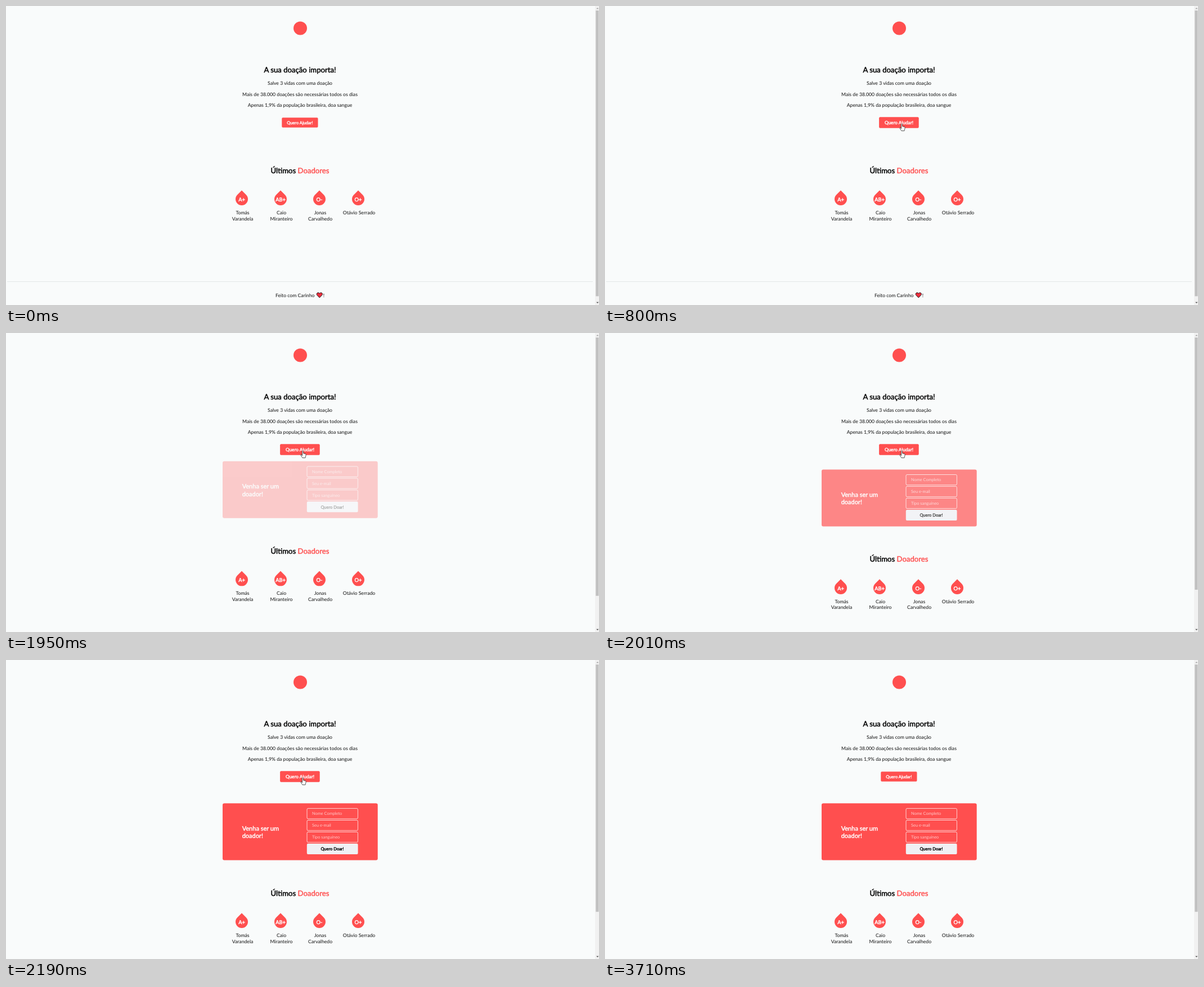
Write an HTML page that moves like this. It is 1054 px wide and 531 px high and loops after 4240 ms.

```html
<!DOCTYPE html>
<html lang="pt-BR">
<head>
<meta charset="utf-8">
<title>Doação de sangue</title>
<style>
html, body { margin: 0; width: 100%; height: 100%; overflow: hidden; background: #f9fbfb; }
svg { display: block; width: 1054px; height: 531px; }
text { font: 8.66px Lato, sans-serif; fill: #111; text-anchor: middle; text-rendering: geometricPrecision; }
.left { text-anchor: start; }
.bold { stroke: #000; stroke-width: .04em; fill: #000; }
.title { font-size: 13.15px; stroke-width: .033em; }
.lead { font-size: 11px; }
.label { font-size: 7.5px; stroke-width: .05em; }
.type { font-size: 9.3px; stroke-width: .05em; }
.hint { font-size: 7.4px; fill: #ffcaca; }
.white { fill: #fff; stroke: #fff; }
.red { fill: #ff4f4f; }
tspan.red { stroke: #ff4f4f; }
.field { fill: none; stroke: #fff; stroke-width: .75; }
.mouse { fill: #fff; stroke: #111; stroke-width: .7; stroke-linejoin: round; }
</style>
</head>
<body>
<svg viewBox="0 0 1054 531">
  <circle class="red" cx="523" cy="39.5" r="12"/>
  <text class="bold title" x="522.5" y="118">A sua doação importa!</text>
  <text x="522.5" y="140.3">Salve 3 vidas com uma doação</text>
  <text x="522.5" y="159.5">Mais de 38.000 doações são necessárias todos os dias</text>
  <text x="522.5" y="178.8">Apenas 1,9% da população brasileira, doa sangue</text>

  <g id="button">
    <rect class="red" x="490.3" y="198.2" width="64.2" height="17.6" rx="1.7"/>
    <text class="bold white label" x="522.4" y="209.9">Quero Ajudar!</text>
  </g>

  <g id="form">
    <rect class="red" x="385" y="254.5" width="275.7" height="101" rx="3"/>
    <text class="bold white left lead" x="419.7" y="303">Venha ser um</text>
    <text class="bold white left lead" x="419.7" y="316.2">doador!</text>
    <g id="fields"></g>
    <rect x="534.8" y="326" width="90.8" height="19" rx="2" fill="#f0f0f4"/>
    <text class="bold label" x="580" y="338.2">Quero Doar!</text>
  </g>

  <g id="low">
    <text class="bold title" x="522.5" y="296.6">Últimos <tspan class="red">Doadores</tspan></text>
    <g id="donors"></g>
    <path d="M2 489.5H1043" stroke="#dde3e3" stroke-width=".8"/>
    <text class="left" x="478.9" y="516.5">Feito com Carinho</text>
    <path d="M557.3 518L553 513.6C550.4 510.3 555 507.2 557.3 510.6C559.6 507.2 564.2 510.3 561.6 513.6Z"
      fill="#ee2f3f" stroke="#111" stroke-width="1" stroke-linejoin="round"/>
    <text x="565" y="516.5">!</text>
  </g>

  <rect x="1047" width="7" height="531" fill="#f1f1f1"/>
  <rect id="thumb" x="1048.3" y="8" width="5.2" fill="#c1c1c1"/>
  <path d="M1049.2 5.2h4.2l-2.1-2.2z" fill="#a3a3a3"/>
  <path d="M1049.2 525.8h4.2l-2.1 2.2z" fill="#505050"/>

  <circle id="press" cx="526" cy="210" r="6" fill="#fd0" opacity=".6"/>
  <path id="arrow" class="mouse" d="M0 0V9.3L2.1 7.3 3.6 10.6 5.1 9.9 3.7 6.7H6.6Z"/>
  <path id="hand" class="mouse" d="M-1 .5a1 1 0 0 1 2 0V4l3.6 .8q1.2 .4 1.1 1.7l-.6 3-.6 2.5h-5l-3-4.6q-.4-1.2 .8-1.2l.7 .7 1 1.2Z"/>
</svg>
<script>
const $ = id => document.getElementById(id);
const LOOP = 4240;

$('fields').innerHTML = ['Nome Completo', 'Seu e-mail', 'Tipo sanguíneo'].map((label, i) => {
  const y = 263.6 + 20.9 * i;
  return `<rect class="field" x="535" y="${y}" width="90.4" height="18.4" rx="2"/>
    <text class="hint left" x="544" y="${y + 11.8}">${label}</text>`;
}).join('');

$('donors').innerHTML = [
  ['A+', 'Tomás', 'Varandela'],
  ['AB+', 'Caio', 'Miranteiro'],
  ['O-', 'Jonas', 'Carvalhedo'],
  ['O+', 'Otávio Serrado', '']
].map(([type, first, last], i) => `<g transform="translate(${419 + 69 * i} 343)">
    <path class="red" transform="rotate(45)" d="M-11 -11H0A11 11 0 1 1 -11 0Z"/>
    <text class="bold white type" y="3.6">${type}</text>
    <text x="1.5" y="27">${first}</text>
    <text x="1.5" y="37.6">${last}</text>
  </g>`).join('');

const clamp = x => Math.min(1, Math.max(0, x));
const smooth = x => (x = clamp(x), x * x * (3 - 2 * x));
const mix = (a, b, p) => a + (b - a) * p;

// CSS "ease": cubic-bezier(.25, .1, .25, 1)
function ease(x) {
  if (x <= 0 || x >= 1) return clamp(x);
  const curve = (a, b, s) => 3 * a * s * (1 - s) ** 2 + 3 * b * s * s * (1 - s) + s ** 3;
  let lo = 0, hi = 1;
  for (let i = 0; i < 20; i++) {
    const mid = (lo + hi) / 2;
    if (curve(.25, .25, mid) < x) lo = mid; else hi = mid;
  }
  return curve(.1, 1, lo);
}

function pointer(t) {
  if (t < 130 || t >= 3710) return null;
  if (t < 680) {
    const p = smooth((t - 130) / 480);
    return [mix(1030, 531, p), mix(527, 217.5, p)];
  }
  if (t < 3140) return [527.5, 209.7];
  const p = smooth((t - 3140) / 510);
  return [mix(530.5, 1017, p), mix(211, 527, p)];
}

const show = (el, on) => el.style.display = on ? '' : 'none';

function draw(t) {
  const hover = t < 680 ? 0 : ease((t - 655) / 150) - ease((t - 3190) / 150);
  $('button').setAttribute('transform',
    `translate(522.4 207) scale(${1 + .1 * hover}) translate(-522.4 -207)`);

  const open = t >= 1920;
  const p = ease((t - 1893) / 300);
  const lift = 37 * (1 - p);
  show($('form'), open);
  $('form').setAttribute('opacity', p);
  $('form').setAttribute('transform', `translate(0 ${-lift})`);
  $('low').setAttribute('transform', `translate(0 ${open ? 122 - lift : 0})`);
  $('thumb').setAttribute('height', 274500 / (open ? 625 - lift : 541));

  show($('press'), t >= 1790 && t < 1920);
  const at = pointer(t);
  const onButton = at && t >= 680 && at[1] < 217;
  show($('hand'), onButton);
  show($('arrow'), at && !onButton);
  if (at) $(onButton ? 'hand' : 'arrow').setAttribute('transform', `translate(${at})`);
}

const start = performance.now();
function tick() {
  draw((performance.now() - start) % LOOP);
  requestAnimationFrame(tick);
}
tick();
</script>
</body>
</html>
```
